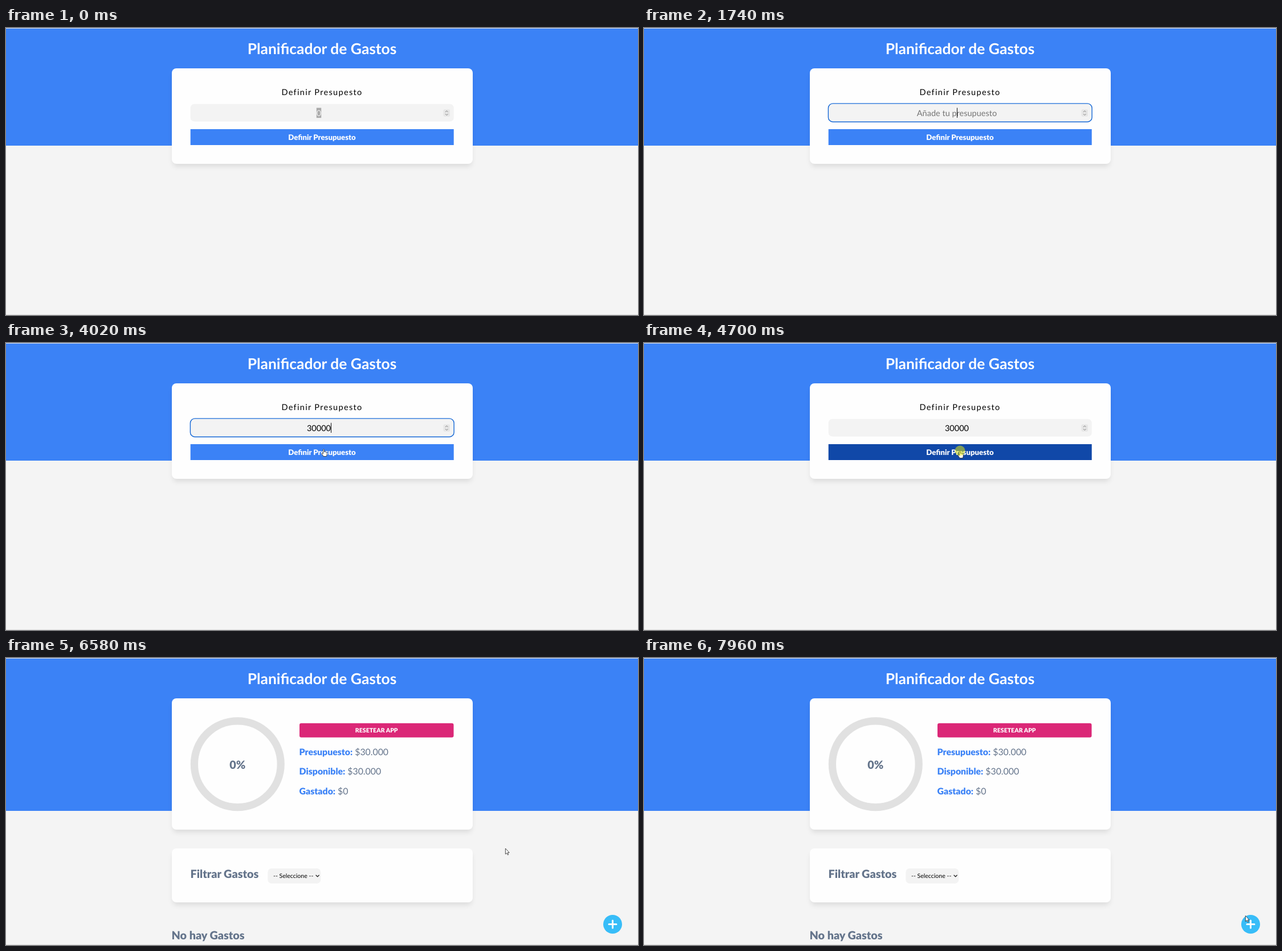
Animation, 1109 px wide and 505 px high, one loop 8 s. Source, as an HTML page:

```html
<!DOCTYPE html>
<html lang="es">
<head>
<meta charset="utf-8">
<title>Planificador de Gastos</title>
<style>
  html, body { margin: 0; width: 100%; height: 100%; overflow: hidden; background: #f4f4f4; }
  #stage { position: relative; width: 1109px; height: 505px; overflow: hidden; background: #f4f4f4; }
  #stage div { position: absolute; }
  .view { inset: 0; }
  .band { left: 0; top: 0; width: 100%; background: #3b82f6; }
  .card { left: 290.5px; width: 528px; background: #fefefe; border-radius: 8px;
    box-shadow: 0 6.6px 9.9px -2px rgba(0, 0, 0, .1); }
  .edge { left: 0; width: 100%; height: 1px; }
  svg { position: absolute; left: 0; top: 0; }
  text { font-family: Lato, sans-serif; font-size: 14.52px; text-rendering: geometricPrecision; }
  .mid { text-anchor: middle; }
  .h1 { font-size: 26.4px; font-weight: 700; fill: #fff; }
  .h2 { font-size: 19.8px; font-weight: 900; fill: #64748b; }
  .label { letter-spacing: 1.32px; }
  .submit { font-size: 13.2px; font-weight: 900; fill: #fff; }
  .reset { font-size: 10.56px; font-weight: 900; fill: #fff; }
  .select { font-size: 10.56px; }
  .stat { font-size: 15.84px; fill: #64748b; }
  .stat tspan { font-weight: 900; fill: #3b82f6; }
  .line { fill: none; stroke-linecap: round; stroke-linejoin: round; }
  .pointer { fill: #fff; stroke: #222; stroke-width: .8; stroke-linejoin: round; }
</style>
</head>
<body>
<div id="stage">
  <div class="view" id="form">
    <div class="band" style="height:206.5px"></div>
    <div class="card" style="top:71px;height:168px"></div>
    <svg width="1109" height="505">
      <text class="mid label" x="554.5" y="118.2">Definir Presupesto</text>
      <rect x="323.7" y="133.7" width="462" height="30.8" rx="6.6" fill="#f3f3f3"/>
      <rect id="ring" x="323.4" y="132.9" width="462.7" height="32.3" rx="8" fill="none" stroke="#1668d6" stroke-width="1.4"/>
      <rect x="767.5" y="143.2" width="11.5" height="12.6" rx="2" fill="#e6e6e6"/>
      <path class="line" d="M771.2 147.8l2.1-2.2 2.1 2.2M771.2 151.3l2.1 2.2 2.1-2.2" stroke="#777" stroke-width=".9"/>
      <rect id="selection" x="544.8" y="140.5" width="8.4" height="17.6" fill="#a9a9a9"/>
      <text class="mid" id="value" x="549" y="154.9"></text>
      <rect id="caret" y="140.5" width="1" height="17.5" fill="#111"/>
      <rect id="submit" x="323.7" y="178" width="462" height="28"/>
      <text class="mid submit" x="554.5" y="197">Definir Presupuesto</text>
    </svg>
  </div>

  <div class="view" id="dash">
    <div class="band" style="height:269.3px"></div>
    <div class="card" style="top:71px;height:231px"></div>
    <div class="card" style="top:335px;height:94.5px"></div>
    <svg width="1109" height="505">
      <circle cx="406.3" cy="186.7" r="75.9" fill="none" stroke="#e1e1e1" stroke-width="13.2"/>
      <text class="mid h2" x="406.3" y="195.4">0%</text>
      <rect x="515" y="114.8" width="270.5" height="25" rx="3.3" fill="#db2777"/>
      <text class="mid reset" x="650.2" y="131.4">RESETEAR APP</text>
      <text class="stat" x="514.6" y="171.4"><tspan>Presupuesto:</tspan> $30.000</text>
      <text class="stat" x="514.6" y="205.4"><tspan>Disponible:</tspan> $30.000</text>
      <text class="stat" x="514.6" y="239.5"><tspan>Gastado:</tspan> $0</text>
      <text class="h2" x="323.5" y="387">Filtrar Gastos</text>
      <rect x="459.3" y="370.3" width="93" height="26.4" rx="6.6" fill="#f3f3f3"/>
      <text class="select" x="469" y="387.2">-- Seleccione --</text>
      <path class="line" d="M544 382.2l2.6 2.6 2.6-2.6" stroke="#222" stroke-width="1.3"/>
      <text class="h2" x="290.5" y="495">No hay Gastos</text>
      <circle cx="1064.5" cy="468.5" r="16.5" fill="#38bdf8"/>
      <path class="line" d="M1058 468.5h13M1064.5 462v13" stroke="#fff" stroke-width="3"/>
    </svg>
  </div>

  <svg width="1109" height="505">
    <text class="mid h1" x="554.5" y="46">Planificador de Gastos</text>
    <g id="cursor">
      <path id="arrow" class="pointer" d="M.4.5V10.6L2.7 8.5 4.3 12 5.8 11.3 4.3 7.9H7.2Z"/>
      <path id="hand" class="pointer" d="M-1 1Q0-.4 1 1V5Q2 4.3 2.7 5.3 3.8 4.7 4.3 5.8 5.6 5.5 5.7 7V9.5Q5.6 11 4.6 13H-.5Q-1.5 11-3.4 8.4-3.6 7-2.3 7.2L-1 8.4Z"/>
      <path id="beam" class="line" d="M-2-6.5H2M0-6.5V6.5M-2 6.5H2" stroke="#333" stroke-width=".9"/>
    </g>
    <circle id="halo" r="9" fill="#f8f800" fill-opacity=".48"/>
  </svg>

  <div class="edge" style="top:0;background:#dfe3ea"></div>
  <div class="edge" style="top:504px;background:#dedede"></div>
</div>

<script>
const LOOP = 8000, DASH_AT = 4770, HOVER_AT = 4090;
const $ = id => document.getElementById(id);
const show = (id, on) => { $(id).style.display = on ? '' : 'none'; };
const within = (t, a, b) => t >= a && t < b;

// time, field text, caret visible
const typing = [
  [0, '0', 0], [880, '0', 1], [1410, '0', 0], [1740, '', 1], [1940, '', 0],
  [2200, '3', 1], [2400, '30', 1], [2530, '300', 1], [2750, '3000', 1],
  [2950, '30000', 1], [3550, '30000', 0], [4020, '30000', 1], [4630, '30000', 0]
];

// pointer strokes: sampled in even steps along evenly spaced points
const strokes = [
  { from: 70, to: 680, steps: 10, ease: 1.8, pts: [[1016, 461], [500, 157]] },
  { from: 3550, to: 4300, steps: 11, ease: 1,
    pts: [[500, 157], [520, 159], [541, 166], [557.5, 186.5], [557, 190], [554.5, 189.5]] },
  { from: 5560, to: 6320, steps: 12, ease: 1, pts: [[554, 189], [585, 180], [625, 175.5], [662, 181], [690, 192]] },
  { from: 6370, to: 7140, steps: 12, ease: 2.37, pts: [[690, 192], [1041, 461]] },
  { from: 7200, to: 7960, steps: 12, ease: 1,
    pts: [[1042, 460], [1050, 465], [1060, 470], [1064, 466], [1058, 457], [1055, 453]] }
];

function pointerAt(t) {
  const s = strokes.filter(k => t >= k.from).pop();
  if (!s) return null;
  const n = s.steps - 1;
  const raw = Math.min(1, (t - s.from) / (s.to - s.from));
  const u = 1 - Math.pow(1 - Math.floor(raw * n + 1e-6) / n, s.ease);
  const f = u * (s.pts.length - 1);
  const i = Math.min(s.pts.length - 2, Math.floor(f));
  const [a, b] = [s.pts[i], s.pts[i + 1]];
  return a.map((v, k) => v + (b[k] - v) * (f - i));
}

function pointerKind(x, y, dash) {
  if (dash) return Math.hypot(x - 1064.5, y - 468.5) < 15.5 ? 'hand' : 'arrow';
  if (x < 324 || x > 785) return 'arrow';
  if (y > 134 && y < 164.5) return 'beam';
  return y > 178 && y < 206 ? 'hand' : 'arrow';
}

function render(t) {
  const dash = t >= DASH_AT;
  show('form', !dash);
  show('dash', dash);

  const [, text, caret] = typing.filter(k => t >= k[0]).pop();
  const selected = t < 880;
  $('value').textContent = text || 'Añade tu presupuesto';
  $('value').setAttribute('fill', selected ? '#f0f0f0' : text ? '#000' : '#757575');
  $('caret').setAttribute('x', Math.round(549 + 4.21 * text.length));
  show('caret', caret);
  show('selection', selected);
  show('ring', within(t, 880, 4630));
  $('submit').setAttribute('fill', t >= HOVER_AT ? '#1048a8' : '#3b82f6');

  const p = pointerAt(t);
  const visible = p && !within(t, 1020, 3550);
  show('cursor', visible);
  show('halo', within(t, 880, 1020) || within(t, 4630, DASH_AT));
  if (!visible) return;
  const [x, y] = p;
  const kind = pointerKind(x, y, dash);
  for (const id of ['arrow', 'hand', 'beam']) show(id, id === kind);
  for (const id of ['cursor', 'halo']) $(id).setAttribute('transform', `translate(${x} ${y})`);
}

const start = performance.now();
function tick() {
  render((performance.now() - start) % LOOP);
  requestAnimationFrame(tick);
}
tick();
</script>
</body>
</html>
```
